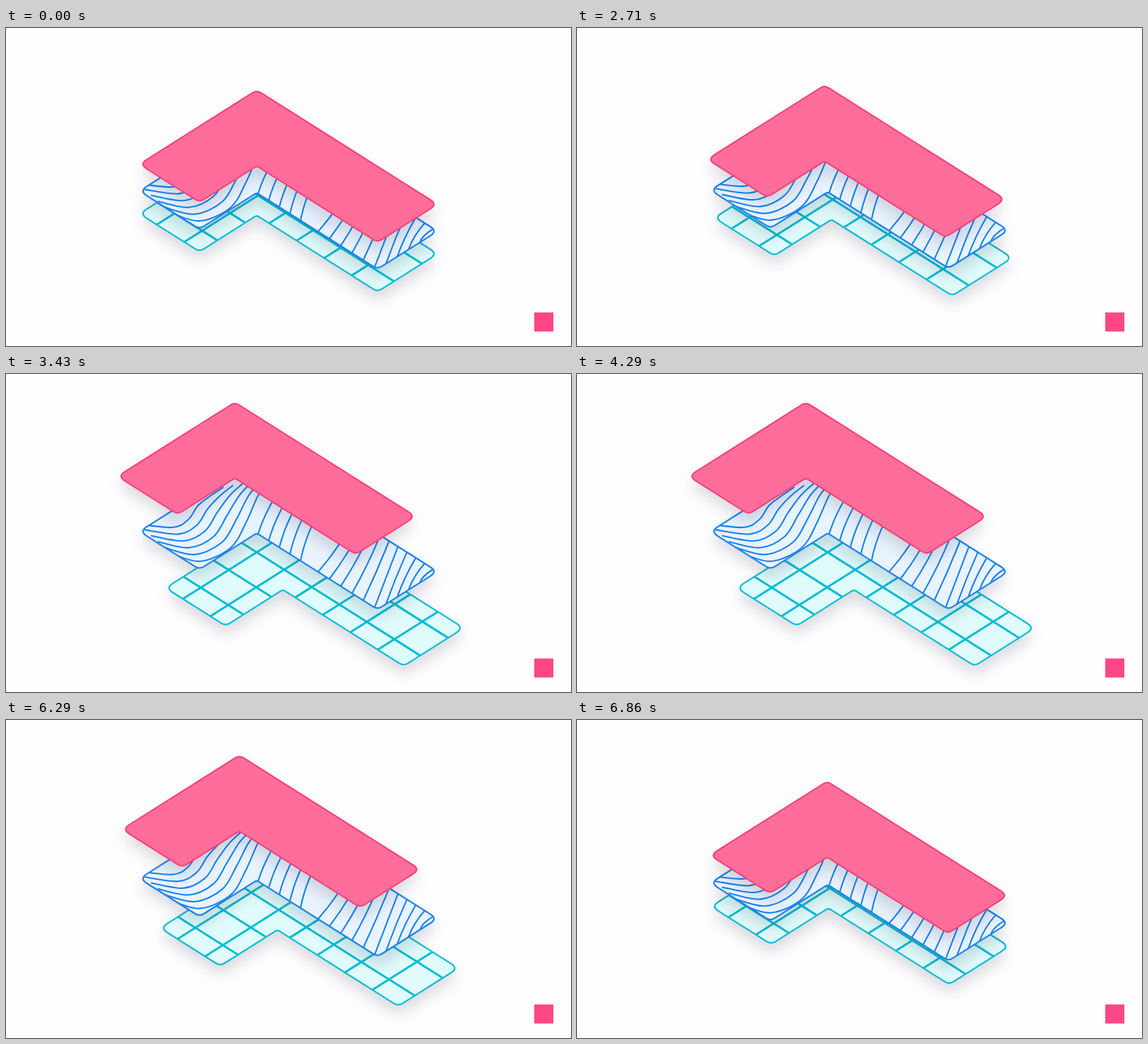
These frames come from a looping animation (800 by 450 pixels, 7.01 s). An HTML page:

```html
<!DOCTYPE html>
<html lang="en">
<head>
<meta charset="utf-8">
<title>Layers</title>
<style>
  html, body { margin: 0; width: 100%; height: 100%; overflow: hidden; background: #fefdff; }
  svg { display: block; width: 100vw; height: 100vh; }
  .layer { filter: url(#shadow); }
  .lines { fill: none; clip-path: url(#inside); }
  .edge { stroke-width: 2.2; stroke-linejoin: round; }
</style>
</head>
<body>
<svg viewBox="0 0 800 450" xmlns="http://www.w3.org/2000/svg">
  <defs>
    <filter id="shadow" x="-20%" y="-20%" width="140%" height="150%" color-interpolation-filters="sRGB">
      <feDropShadow dx="0" dy="12" stdDeviation="10" flood-color="#14182c" flood-opacity=".15"/>
    </filter>
    <clipPath id="inside"><path class="shape"/></clipPath>
  </defs>
  <g id="grid" class="layer">
    <path class="shape" fill="#e0fbfc"/>
    <path class="lines" stroke="#06bcd3" stroke-width="3"/>
    <path class="shape edge" fill="none" stroke="#06bcd3"/>
  </g>
  <g id="contours" class="layer">
    <path class="shape" fill="#e8f3fe"/>
    <path class="lines" stroke="#1a82ec" stroke-width="2.1"/>
    <path class="shape edge" fill="none" stroke="#1a82ec"/>
  </g>
  <g id="cover" class="layer">
    <path class="shape edge" fill="#ff6e9b" stroke="#f6437c"/>
  </g>
  <rect x="748" y="402.5" width="27" height="27" fill="#ff4785"/>
</svg>
<script>
const LOOP = 7010, STEP = 1000 / 7, LAST = 48;
const SLOPE = 0.631;
const LEFT = 166, RIGHT = 256, ARM = 85;

const $ = s => document.querySelector(s);
const lerp = (a, b, t) => a + (b - a) * t;
const times = (n, f) => Array.from({ length: n }, (_, i) => f(i));

// Point on the plate: u runs to the lower right, v to the lower left
const iso = (u, v) => [355 + u - v, 88 + (u + v) * SLOPE];

// L-shaped plate: u, v, corner size
const corners = [
  [0, 0, 6], [RIGHT, 0, 10], [RIGHT, ARM, 6],
  [ARM, ARM, 3], [ARM, LEFT, 6], [0, LEFT, 10]
].map(([u, v, r]) => ({ p: iso(u, v), r }));

function toward(a, b, d) {
  const k = d / Math.abs(b[0] - a[0]);
  return a.map((n, i) => lerp(n, b[i], k));
}

function roundedPath(pts) {
  const n = pts.length;
  return pts.map(({ p, r }, i) => {
    const from = toward(p, pts[(i + n - 1) % n].p, r);
    const to = toward(p, pts[(i + 1) % n].p, r);
    return `${i ? 'L' : 'M'}${from}Q${p} ${to}`;
  }).join('') + 'Z';
}

function gridPath() {
  const across = times(6, i => 24.5 + i * 39).map(u => `M${iso(u, 0)}L${iso(u, LEFT)}`);
  const along = times(4, i => 22 + i * 39.6).map(v => `M${iso(0, v)}L${iso(RIGHT, v)}`);
  return across.concat(along).join('');
}

// Smooth curve through points
function smooth(p) {
  const at = i => p[Math.max(0, Math.min(p.length - 1, i))];
  let d = `M${p[0]}`;
  for (let i = 0; i < p.length - 1; i++) {
    const [a, b, c, e] = [at(i - 1), at(i), at(i + 1), at(i + 2)];
    const c1 = b.map((v, k) => v + (c[k] - a[k]) / 6);
    const c2 = c.map((v, k) => v - (e[k] - b[k]) / 6);
    d += `C${c1} ${c2} ${c}`;
  }
  return d;
}

// Waves of the short arm blend from the outer curve to the inner one
const outer = [[186, 182], [236, 187], [258, 176], [272, 156], [290, 142], [308, 130]];
const inner = [[234, 224], [275, 235], [318, 216], [340, 180], [357, 142], [375, 118]];
const wave = t => smooth(outer.map((p, i) => p.map((n, k) => lerp(n, inner[i][k], t))));

// Stroke across the long arm, from its lower edge to its upper one
function stroke(foot, head, bend) {
  const y0 = Math.min(195 + (foot - 355) * SLOPE, 303 - (foot - 526) * SLOPE);
  const y1 = 88 + (head - 355) * SLOPE;
  return `M${foot},${y0}Q${(foot + head) / 2 - bend},${(y0 + y1) / 2} ${head},${y1}`;
}

function contourPath() {
  return [
    ...times(6, i => wave(i / 5)),
    ...times(5, i => stroke(357 + 15 * i, 400 + 13 * i, 9)),
    ...times(10, i => stroke(442 + 16 * i, 492 + 12.6 * i, 1.6 * i - 8))
  ].join('');
}

document.querySelectorAll('.shape').forEach(e => e.setAttribute('d', roundedPath(corners)));
$('#grid .lines').setAttribute('d', gridPath());
$('#contours .lines').setAttribute('d', contourPath());

// cubic-bezier(.42, 0, .58, 1), solved by bisection
function ease(x) {
  if (x <= 0) return 0;
  if (x >= 1) return 1;
  let lo = 0, hi = 1;
  for (let i = 0; i < 24; i++) {
    const s = (lo + hi) / 2, r = 1 - s;
    if (3 * r * r * s * 0.42 + 3 * r * s * s * 0.58 + s * s * s < x) lo = s; else hi = s;
  }
  return lo * lo * (3 - 2 * lo);
}

// Height when closed, then travel when opened
const layers = [
  ['#cover', 0, -31, -48],
  ['#contours', 38, 0, -8],
  ['#grid', 70, 37, 40]
].map(([id, y, dx, dy]) => ({ el: $(id), y, dx, dy }));

function draw(ms) {
  // The motion is stepped at seven pictures a second
  const t = Math.min(LAST, Math.floor((ms % LOOP + 5) / STEP)) * STEP;
  const open = ease((t - 2450) / 1000) - ease((t - 5970) / 1000);
  for (const { el, y, dx, dy } of layers)
    el.setAttribute('transform', `translate(${dx * open} ${y + dy * open})`);
}

const start = performance.now();
function tick() {
  draw(performance.now() - start);
  requestAnimationFrame(tick);
}
tick();
</script>
</body>
</html>
```
